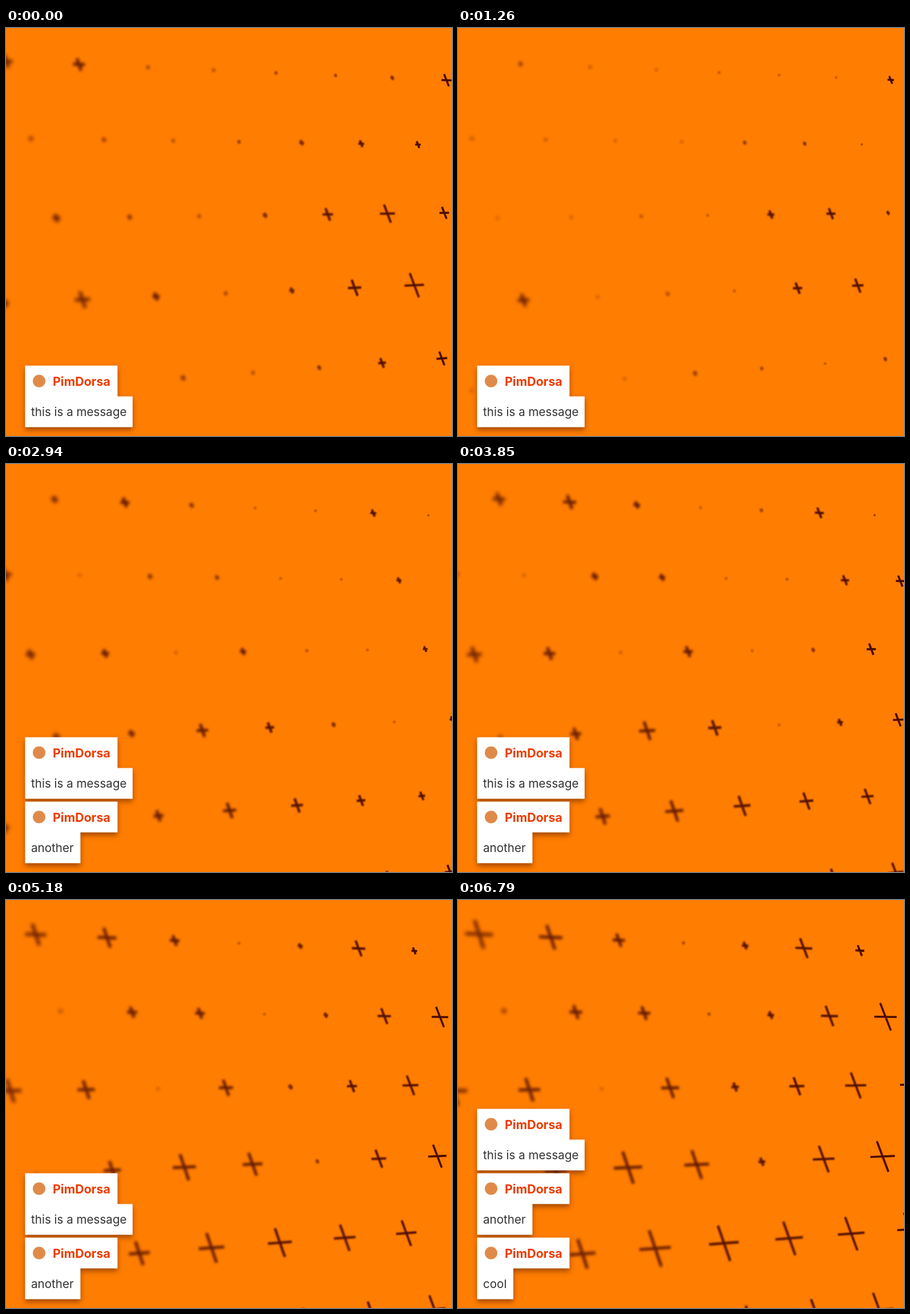
Write an HTML page that moves like this. It is 782x716 px and loops after 6860 ms.

```html
<!DOCTYPE html>
<html lang="en">
<head>
<meta charset="utf-8">
<title>Chat over drifting crosses</title>
<style>
  html, body { margin: 0; width: 100%; height: 100%; overflow: hidden; background: #ff7d00; }
  svg { display: block; }
  text { font-family: Inter, "Open Sans", sans-serif; font-size: 20.6px; fill: #333; }
  .name { font-size: 21.4px; font-weight: 700; fill: #ee3c00; }
  .card { filter: drop-shadow(0 5px 5px rgba(70, 20, 0, .5)); }
</style>
</head>
<body>
<svg id="stage" width="782" height="716" viewBox="0 0 782 716">
  <rect width="782" height="716" fill="#ff7d00"/>
  <g id="field" fill="none" stroke="#400400"></g>
  <g id="chat"></g>
</svg>
<script>
const LOOP = 6860, STEP = 70, DRIFT = 6200, CARD_PITCH = 113;
const USER = 'PimDorsa';

const messages = [
  { text: 'this is a message', width: 188, at: 0 },
  { text: 'another', width: 96.5, at: 2590 },
  { text: 'cool', width: 63, at: 5250 },
];

// Grid places where crosses start out large, and where they stay small at the end.
const peaks = [
  { u: 4, v: 2.8, radius: 1.4, height: 0.15 },
  { u: 6.3, v: 0.6, radius: 0.9, height: 0.13 },
  { u: -1, v: 3, radius: 1, height: 0.08 },
  { u: -0.5, v: -0.2, radius: 0.8, height: 0.1 },
];
const hollows = [
  { u: 3.2, v: 0.5, radius: 1.8 },
  { u: 0.3, v: 1.1, radius: 0.8 },
  { u: 1, v: 2, radius: 0.6 },
  { u: 3, v: 2.6, radius: 0.7 },
  { u: -1, v: 3.3, radius: 1 },
  { u: 6.3, v: -0.3, radius: 0.6 },
];

function make(parent, tag, attrs, content) {
  const node = document.createElementNS('http://www.w3.org/2000/svg', tag);
  for (const key in attrs) node.setAttribute(key, attrs[key]);
  if (content) node.textContent = content;
  return parent.appendChild(node);
}

// Perspective view of the grid plane.
const depth = (u, v) => 1 + 0.0266 * u - 0.013 * v;
function project(u, v) {
  const d = depth(u, v);
  return [(37 + 130 * u + 42.5 * v) / d, (60 + 7.15 * u + 132.2 * v) / d];
}

const falloff = (spot, u, v) =>
  Math.exp(-((u - spot.u) ** 2 + (v - spot.v) ** 2) / spot.radius ** 2);
const startSize = (u, v) =>
  peaks.reduce((sum, p) => sum + p.height * falloff(p, u, v), 0.02);
const endSize = (u, v) =>
  hollows.reduce((size, h) => size * (1 - falloff(h, u, v)), 0.225);

const field = document.getElementById('field');
const crosses = [];
for (let row = 0; row <= 5; row++) {
  for (let col = -2; col <= 6; col++) {
    crosses.push({
      row, col,
      from: -startSize(col, row),
      to: endSize(col, row),
      path: make(field, 'path', {}),
    });
  }
}

const chat = document.getElementById('chat');
for (const msg of messages) {
  const card = msg.node = make(chat, 'g', { class: 'card' });
  make(card, 'path', { d: `M33.5 592.5H195.5V646.5H${34 + msg.width}V700.5H33.5Z`, fill: '#fff' });
  make(card, 'circle', { cx: 58, cy: 619.5, r: 11, fill: '#e08a4a' });
  make(card, 'text', { x: 82, y: 627.5, class: 'name' }, USER);
  make(card, 'text', { x: 44, y: 681 }, msg.text);
}

const point = p => p.map(n => n.toFixed(2)).join(' ');

// Arms shrink through zero and grow again; blur increases towards the left.
function drawCross({ row, col, from, to, path }, progress, shift) {
  const u = col + shift;
  const [x, y] = project(u, row);
  const size = Math.max(0.011, Math.abs(from + (to - from) * progress));
  const blur = Math.max(0.5, 3.2 - x / 280 + y / 2000);
  const opacity = Math.min(1, 0.3 + 14 * size) * (1 - 0.08 * blur);
  path.setAttribute('d',
    `M${point(project(u - size, row))}L${point(project(u + size, row))}` +
    `M${point(project(u, row - size))}L${point(project(u, row + size))}`);
  path.setAttribute('stroke-width', (3 + 0.9 * blur).toFixed(2));
  path.setAttribute('opacity', opacity.toFixed(2));
  path.style.filter = `blur(${blur.toFixed(2)}px)`;
}

function render(ms) {
  const progress = Math.min(ms / DRIFT, 1);
  const shift = 0.718 * (1 - progress);
  for (const cross of crosses) drawCross(cross, progress, shift);

  const shown = messages.filter(msg => ms >= msg.at).length;
  messages.forEach((msg, i) => {
    msg.node.style.display = i < shown ? '' : 'none';
    msg.node.setAttribute('transform', `translate(0 ${(i + 1 - shown) * CARD_PITCH})`);
  });
}

const start = performance.now();
function tick() {
  const elapsed = (performance.now() - start) % LOOP;
  render(Math.floor(elapsed / STEP) * STEP);
  requestAnimationFrame(tick);
}
tick();
</script>
</body>
</html>
```
